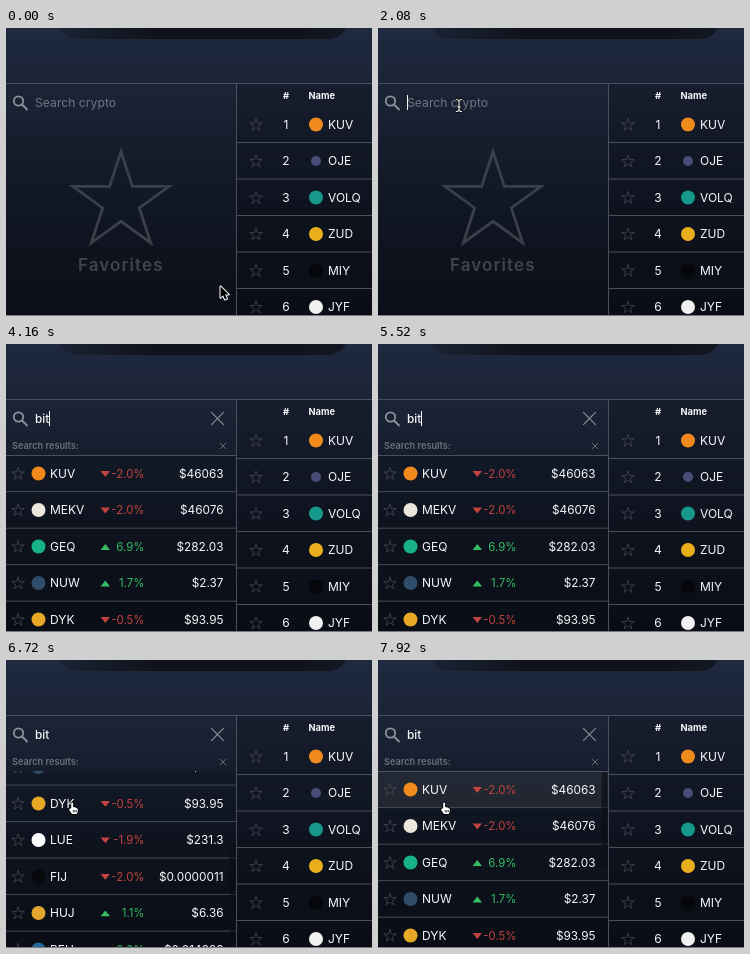
Animation, 366 px wide and 288 px high, one loop 8000 ms. Source, as an HTML page with a canvas:

```html
<!DOCTYPE html>
<html lang="en">
<head>
<meta charset="utf-8">
<title>Coin search</title>
<style>
html, body { margin: 0; width: 100%; height: 100%; overflow: hidden; background: #0c1019; }
canvas { display: block; }
</style>
</head>
<body>
<canvas id="stage" width="366" height="288"></canvas>
<script>
const ctx = document.getElementById('stage').getContext('2d');
const LOOP = 8000, ROW = 36.5, LIST_TOP = 111;
const FOCUS = 1680, KEYS = [2560, 2800, 3120], RESULTS = 4080, HOVER = 5760, SCROLL = 6160, HAND = 6400;
const RED = '#c2433f', GREEN = '#34bd62', LINE = '#4a505b', STAR = '#4b505a', WHITE = '#f7f8fa';

// [name, icon colour, icon radius]
const market = [
  ['KUV', '#f08a1c', 7], ['OJE', '#4a4c78', 5], ['VOLQ', '#16998a', 7],
  ['ZUD', '#e9ae1c', 7], ['MIY', '#06070b', 7], ['JYF', '#f1f1f1', 7]
];
// [name, icon colour, change, price]
const found = [
  ['KUV', '#f08a1c', -2.0, '$46063'],
  ['MEKV', '#ece6dc', -2.0, '$46076'],
  ['GEQ', '#17b28a', 6.9, '$282.03'],
  ['NUW', '#2f4c69', 1.7, '$2.37'],
  ['DYK', '#e6a825', -0.5, '$93.95'],
  ['LUE', '#ffffff', -1.9, '$231.3'],
  ['FIJ', '#08090c', -2.0, '$0.0000011'],
  ['HUJ', '#e2a52f', 1.1, '$6.36'],
  ['PEH', '#23699a', 0.2, '$0.014298']
];
// [time, offset]
const scrollPath = [[SCROLL, 0], [6240, 6], [6320, 20], [6480, 75], [6600, 115], [6720, 132],
  [6880, 140], [7040, 120], [7200, 84.7], [7360, 36], [7440, 12], [7520, 0]];

const arrow = new Path2D('M0 0V11.2L2.6 8.8L4.5 13L6.5 12.1L4.6 8H8.2Z');
const hand = new Path2D('M-1.3 5V.6Q-1.3-.4-.4-.4T.6.6V4.2Q2 3.6 2.4 4.6Q3.7 4.2 4 5.2Q5.3 5 5.3 6.4V8.2Q5.1 9.8 4.2 11H-.5Q-1.7 9.3-3.3 6.9Q-3.7 5.4-2.4 5.7Z');
const knuckles = new Path2D('M.8 7V9.4M2.3 7V9.4M3.8 7V9.4');
const beam = new Path2D('M-3-6Q-.6-6 0-4.6Q.6-6 3-6M0-4.6V4.8M-3 6Q-.6 6 0 4.8Q.6 6 3 6M-1.6 1.5H1.6');

const smooth = x => { x = Math.min(1, Math.max(0, x)); return x * x * (3 - 2 * x); };

function scrollAt(t) {
  for (let i = 1; i < scrollPath.length; i++) {
    const [t0, a] = scrollPath[i - 1], [t1, b] = scrollPath[i];
    if (t >= t0 && t < t1) return a + (b - a) * (t - t0) / (t1 - t0);
  }
  return 0;
}

function text(s, x, y, size, color, { weight = 400, align = 'left', spacing = 0 } = {}) {
  ctx.font = `${weight} ${size}px Inter, sans-serif`;
  ctx.letterSpacing = spacing + 'px';
  ctx.textAlign = align;
  ctx.fillStyle = color;
  ctx.fillText(s, x, y + size * 0.364);
  return ctx.measureText(s).width;
}

function rect(x, y, w, h, color) {
  ctx.fillStyle = color;
  ctx.fillRect(x, y, w, h);
}

function gradient(x, y, ...stops) {
  const g = ctx.createLinearGradient(0, 0, x, y);
  stops.forEach(s => g.addColorStop(...s));
  return g;
}

function dot(x, y, r, color) {
  ctx.fillStyle = color;
  ctx.beginPath();
  ctx.arc(x, y, r, 0, 7);
  ctx.fill();
}

function star(x, y, r, width, color) {
  ctx.beginPath();
  for (let i = 0; i < 10; i++) {
    const a = i * Math.PI / 5, d = i % 2 ? r * 0.382 : r;
    ctx.lineTo(x + d * Math.sin(a), y - d * Math.cos(a));
  }
  ctx.closePath();
  ctx.lineWidth = width;
  ctx.strokeStyle = color;
  ctx.stroke();
}

function cross(x, y, r, width, color) {
  ctx.beginPath();
  ctx.moveTo(x - r, y - r); ctx.lineTo(x + r, y + r);
  ctx.moveTo(x + r, y - r); ctx.lineTo(x - r, y + r);
  ctx.lineWidth = width;
  ctx.strokeStyle = color;
  ctx.stroke();
}

function triangle(x, y, up) {
  const d = up ? -2.9 : 2.9;
  ctx.fillStyle = up ? GREEN : RED;
  ctx.beginPath();
  ctx.moveTo(x - 4.7, y - d); ctx.lineTo(x + 4.7, y - d); ctx.lineTo(x, y + d);
  ctx.fill();
}

function pointer(path, x, y, outline, width, fill, detail) {
  ctx.save();
  ctx.translate(x, y);
  ctx.lineJoin = 'round';
  ctx.strokeStyle = outline;
  ctx.lineWidth = width;
  ctx.stroke(path);
  ctx.fillStyle = fill;
  ctx.fill(path);
  if (detail) {
    ctx.lineWidth = 0.7;
    ctx.stroke(detail);
  }
  ctx.restore();
}

function backdrop() {
  rect(0, 0, 366, 288, gradient(0, 288, [0, '#1f293f'], [0.2, '#1b2436'], [0.55, '#121826'], [1, '#0b0e17']));
  ctx.fillStyle = gradient(366, 0, [0.14, '#1b2334'], [0.4, '#10131b'], [0.8, '#10131b'], [0.94, '#141924']);
  ctx.beginPath();
  ctx.roundRect(52, -40, 290, 51, 20);
  ctx.fill();
  rect(231, 56, 135, 232, 'rgba(8,10,16,.25)');
  rect(0, 55, 366, 1, LINE);
}

function marketTable() {
  text('#', 280, 67.5, 9.5, WHITE, { weight: 700, align: 'center' });
  text('Name', 302.5, 67.5, 9.3, WHITE, { weight: 700 });
  market.forEach(([name, color, r], i) => {
    const y = 96.5 + ROW * i;
    star(250, y + 0.5, 6.6, 0.7, STAR);
    text(i + 1, 280, y, 12, WHITE, { align: 'center' });
    dot(310, y, r, color);
    text(name, 322, y, 12, WHITE);
    rect(231, y + 17.5, 135, 1, LINE);
  });
  rect(230, 55, 1, 233, LINE);
}

function searchBox(t) {
  ctx.strokeStyle = '#8d929b';
  ctx.lineWidth = 1.8;
  ctx.beginPath();
  ctx.arc(12.5, 73, 4.7, 0, 7);
  ctx.moveTo(16, 76.5);
  ctx.lineTo(21.5, 82);
  ctx.stroke();

  const typed = 'bit'.slice(0, KEYS.filter(k => t >= k).length);
  let width = 0;
  if (typed) {
    width = text(typed, 29, 74.5, 11.8, WHITE, { weight: 500 });
    cross(211.5, 74.5, 6.3, 1.1, '#8d929b');
  } else {
    text('Search crypto', 29, 74.5, 12.2, '#70757f');
  }
  const since = t - [FOCUS, ...KEYS].filter(k => t >= k).pop();
  if (since % 1000 < 500) rect(Math.floor(29 + width), 67, 1, 15, WHITE);
}

function favorites() {
  star(115, 174, 50.5, 2.8, '#3a404a');
  text('Favorites', 72, 237, 17, '#3f454f', { weight: 600, spacing: 1.1 });
}

function results(t) {
  const offset = scrollAt(t);
  text('Search results:', 6, 102, 9.2, '#6c717b', { weight: 600 });
  cross(217, 102, 3, 0.9, '#70757f');
  ctx.save();
  ctx.beginPath();
  ctx.rect(0, LIST_TOP, 230, 288 - LIST_TOP);
  ctx.clip();
  rect(0, LIST_TOP, 230, 177, 'rgba(8,10,16,.22)');
  rect(0, LIST_TOP - offset, 230, 1, LINE);
  found.forEach(([name, color, change, price], i) => {
    const y = 129.5 + ROW * i - offset, up = change > 0;
    if (i === 0 && t >= HOVER) rect(0, y - 18, 230, ROW, 'rgba(255,245,235,.07)');
    star(12, y + 0.5, 6.6, 0.7, STAR);
    dot(32.5, y, 7, color);
    text(name, 44, y, 12, WHITE);
    triangle(99.3, y + 0.5, up);
    text(change.toFixed(1) + '%', 138.5, y, 11.4, up ? GREEN : RED, { align: 'right' });
    text(price, 217.5, y, 11.8, WHITE, { align: 'right' });
    rect(0, y + 17.7, 230, 0.9, LINE);
  });
  if (t >= SCROLL) {
    ctx.fillStyle = 'rgba(12,14,20,.65)';
    ctx.beginPath();
    ctx.roundRect(223.5, 112 + offset * 0.55, 6, 95, 3);
    ctx.fill();
  }
  ctx.restore();
}

function cursor(t) {
  if (t < KEYS[0]) {
    const p = smooth((t - 240) / 1240);
    const x = 214.5 - 133.5 * p, y = 258.5 - 181 * p;
    if (y > 92) return pointer(arrow, x, y, '#fff', 2, '#000');
    pointer(beam, x, y, '#000', 2.6, 'transparent');
    pointer(beam, x, y, '#fff', 1.1, 'transparent');
  } else if (t >= HAND) {
    pointer(hand, 66.5, 143, '#000', 1.6, '#fff', knuckles);
  }
}

function draw(t) {
  backdrop();
  marketTable();
  searchBox(t);
  if (t < RESULTS) favorites();
  else results(t);
  rect(0, 287, 366, 1, '#777a80');
  cursor(t);
}

function frame() {
  draw(performance.now() % LOOP);
  requestAnimationFrame(frame);
}
frame();
</script>
</body>
</html>
```
